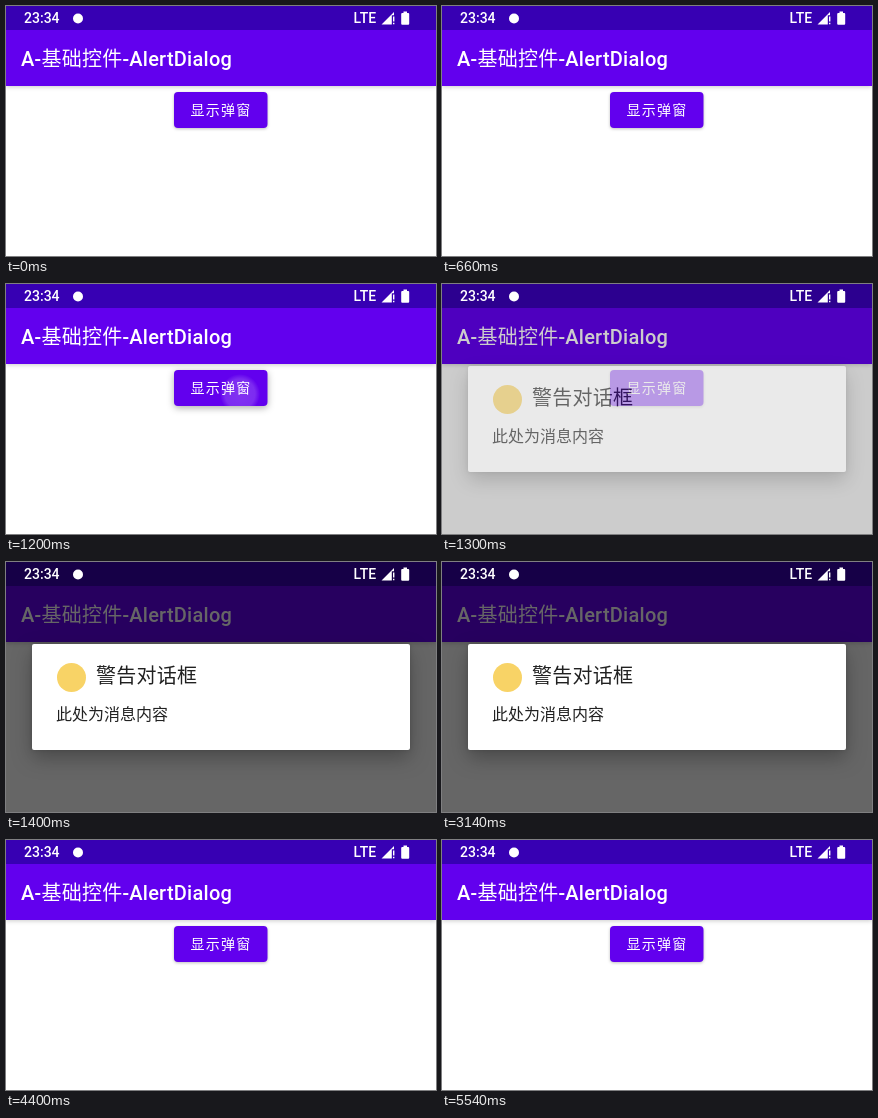
Recreate the animation shown at these times as an HTML page. Size 430x250 px, loop 6.3 s.

```html
<!DOCTYPE html>
<html lang="zh-CN">
<head>
<meta charset="utf-8">
<title>AlertDialog</title>
<style>
  html, body { margin: 0; width: 100%; height: 100%; overflow: hidden; background: #fff; }
  svg { display: block; }
  text { font-family: Roboto, "Noto Sans CJK SC", "Noto Sans CJK", sans-serif; font-weight: 400; white-space: pre; }
  .latin { font-weight: 500; }
  .title { font-size: 20px; letter-spacing: .25px; }
  .label { font-size: 14px; letter-spacing: 1.25px; }
  .body { font-size: 16px; }
  .status { font-size: 14px; }
  .bar { filter: drop-shadow(0 1px 2px rgba(0, 0, 0, .2)); }
  .card { filter: drop-shadow(0 8px 10px rgba(0, 0, 0, .25)) drop-shadow(0 0 2px rgba(0, 0, 0, .15)); }
</style>
</head>
<body>
<svg width="430" height="250" viewBox="0 0 430 250">
  <defs>
    <radialGradient id="glow">
      <stop offset="0" stop-color="#fff" stop-opacity=".2"/>
      <stop offset=".75" stop-color="#fff" stop-opacity=".17"/>
      <stop offset="1" stop-color="#fff" stop-opacity="0"/>
    </radialGradient>
    <clipPath id="buttonShape"><rect x="168" y="86" width="93.5" height="36" rx="4"/></clipPath>
  </defs>

  <!-- Screen -->
  <rect width="430" height="250" fill="#fff"/>
  <rect class="bar" y="24" width="430" height="56" fill="#6200ee"/>
  <rect width="430" height="24" fill="#3700b3"/>
  <text class="title" x="15" y="60" fill="#fff"><tspan class="latin">A-</tspan>基础控件<tspan class="latin">-AlertDialog</tspan></text>
  <rect id="button" x="168" y="86" width="93.5" height="36" rx="4" fill="#6200ee"/>
  <g clip-path="url(#buttonShape)">
    <circle id="ripple" cx="234" cy="110" r="20" fill="url(#glow)"/>
  </g>
  <text class="label" x="184.5" y="109" fill="#fff">显示弹窗</text>

  <rect id="scrim" width="430" height="250" fill="#000"/>

  <!-- Dialog -->
  <g id="dialog">
    <rect class="card" x="26" y="82" width="378" height="106" rx="2" fill="#fff"/>
    <circle cx="65.5" cy="115.5" r="14.5" fill="#f8d366"/>
    <text class="title" x="90" y="121" fill="#212121">警告对话框</text>
    <text class="body" x="50" y="157.5" fill="#212121">此处为消息内容</text>
  </g>

  <!-- Status icons stay bright above the scrim -->
  <g fill="#fff">
    <text class="status latin" x="18" y="17">23:34</text>
    <circle cx="72" cy="12.5" r="5"/>
    <text class="status latin" x="347.5" y="17">LTE</text>
    <path d="M375.5 18.5 388 6v3.2h-2.2v9.3z"/>
    <path d="M387 10.5h1.4v5H387zM387 16.7h1.4v1.6H387z"/>
    <path d="M397.5 7V5.5h3.5V7h1.2q1 0 1 1v9.8q0 1-1 1h-6q-1 0-1-1V8q0-1 1-1z"/>
  </g>
</svg>
<script>
  const LOOP = 6300;
  const REST = "drop-shadow(0 1px 1.5px rgba(0,0,0,.25))";
  const RAISED = "drop-shadow(0 2px 3.5px rgba(0,0,0,.32))";

  // Each step holds until the next: start time, scrim, dialog, pressed
  const steps = [
    [0, 0, 0, 0],
    [1200, 0, 0, 1],
    [1300, .2, .6, 0],
    [1400, .6, 1, 0],
    [4300, .3, .35, 0],
    [4400, 0, 0, 0]
  ];

  const [button, ripple, scrim, dialog] =
    ["button", "ripple", "scrim", "dialog"].map(id => document.getElementById(id));
  const start = performance.now();

  function draw() {
    const time = (performance.now() - start) % LOOP;
    const [, dim, shown, pressed] = steps.findLast(step => step[0] <= time);
    scrim.style.opacity = dim;
    dialog.style.opacity = shown;
    ripple.style.opacity = pressed;
    button.style.filter = pressed ? RAISED : REST;
    requestAnimationFrame(draw);
  }
  draw();
</script>
</body>
</html>
```
